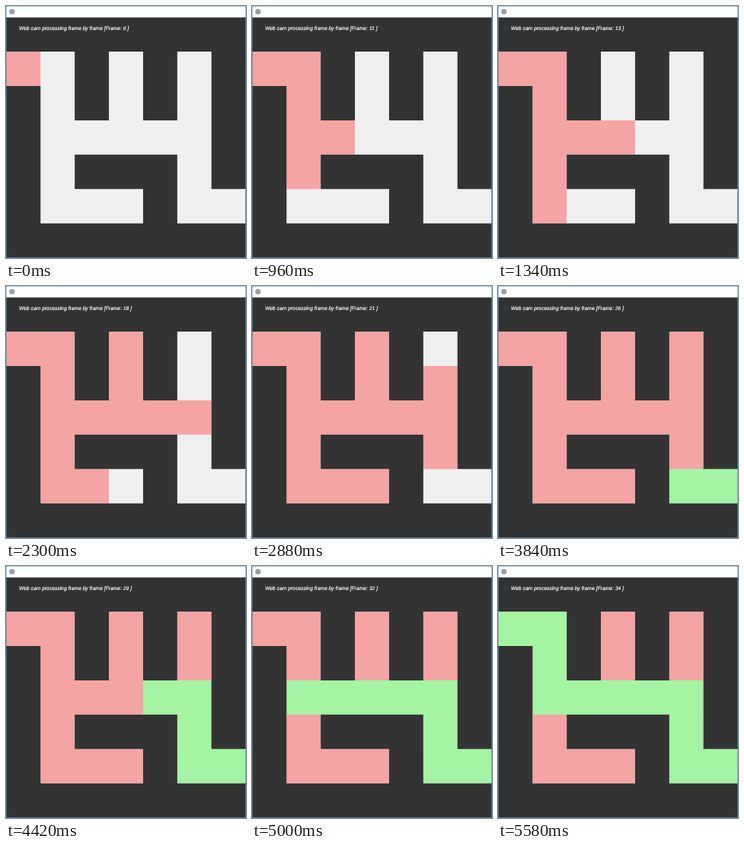
An HTML page that plays this animation: 301 px wide and 315 px high, repeating every 7.7 s.

```html
<!DOCTYPE html>
<html lang="en">
<head>
<meta charset="utf-8">
<title>Maze search</title>
<style>
  html, body { margin: 0; width: 100%; height: 100%; overflow: hidden; background: #333; }
  svg { display: block; width: 301px; height: 315px; }
  text {
    font: italic 15px "Liberation Sans", Arial, sans-serif;
    fill: #fff;
    stroke: #fff;
    stroke-width: .4px;
    text-rendering: geometricPrecision;
    white-space: pre;
  }
</style>
</head>
<body>
<!-- Drawn in window pixels: 100 px cells, a 33 px title bar and a 1 px border. -->
<svg viewBox="0 0 702 734" preserveAspectRatio="none">
  <g transform="translate(1 33)">
    <rect width="700" height="700" fill="#efefef"/>
    <path id="visited" fill="#f4a4a4"/>
    <path id="route" fill="#a4f4a4"/>
    <path id="walls" fill="#333"/>
    <text id="label" x="37" y="37"></text>
  </g>
  <rect width="702" height="33" fill="#fff"/>
  <circle cx="17.5" cy="16.5" r="8" fill="#999fa6"/>
  <rect x=".5" y=".5" width="701" height="733" fill="none" stroke="#1883d7"/>
</svg>
<script>
const CELL = 100;
const LOOP = 7700, STEP = 192.7, TICK = 20;
const FIRST_COUNT = 6, LAST_COUNT = 34;

const maze = [
  '#######',
  '..#.#.#',
  '#.#.#.#',
  '#.....#',
  '#.###.#',
  '#...#..',
  '#######'
];
const directions = [[-1, 0], [0, 1], [1, 0], [0, -1]];
const byId = id => document.getElementById(id);

// Breadth-first search from the left entrance; the exit is reached last.
function search(row, col) {
  const seen = new Set([row + ',' + col]);
  const queue = [{ row, col, parent: null }];
  for (const cell of queue) {
    for (const [dr, dc] of directions) {
      const r = cell.row + dr, c = cell.col + dc, key = r + ',' + c;
      if (maze[r]?.[c] !== '.' || seen.has(key)) continue;
      seen.add(key);
      queue.push({ row: r, col: c, parent: cell });
    }
  }
  return queue;
}

// One path per colour keeps neighbouring cells free of seams.
function fillCells(id, cells) {
  const square = ({ row, col }) => `M${col * CELL} ${row * CELL}h${CELL}v${CELL}h${-CELL}z`;
  byId(id).setAttribute('d', cells.map(square).join(''));
}

const visited = search(1, 0);
const route = [];
for (let cell = visited.at(-1); cell; cell = cell.parent) route.push(cell);
const lastStep = visited.length + route.length - 1;

const walls = maze.flatMap((line, row) =>
  [...line].map((type, col) => ({ type, row, col })).filter(cell => cell.type === '#'));
fillCells('walls', walls);

let shown = -1;
function draw(time) {
  const tickEnd = (Math.floor(time % LOOP / TICK) + 1) * TICK;
  const step = Math.min(Math.ceil(tickEnd / STEP) - 1, lastStep);
  if (step === shown) return;
  shown = step;
  fillCells('visited', visited.slice(0, step + 1));
  fillCells('route', route.slice(0, Math.max(0, step + 1 - visited.length)));
  const count = Math.min(FIRST_COUNT + step, LAST_COUNT);
  byId('label').textContent = `Web cam processing frame by frame [Frame: ${count} ]`;
}

const start = performance.now();
function animate() {
  draw(performance.now() - start);
  requestAnimationFrame(animate);
}
animate();
</script>
</body>
</html>
```
